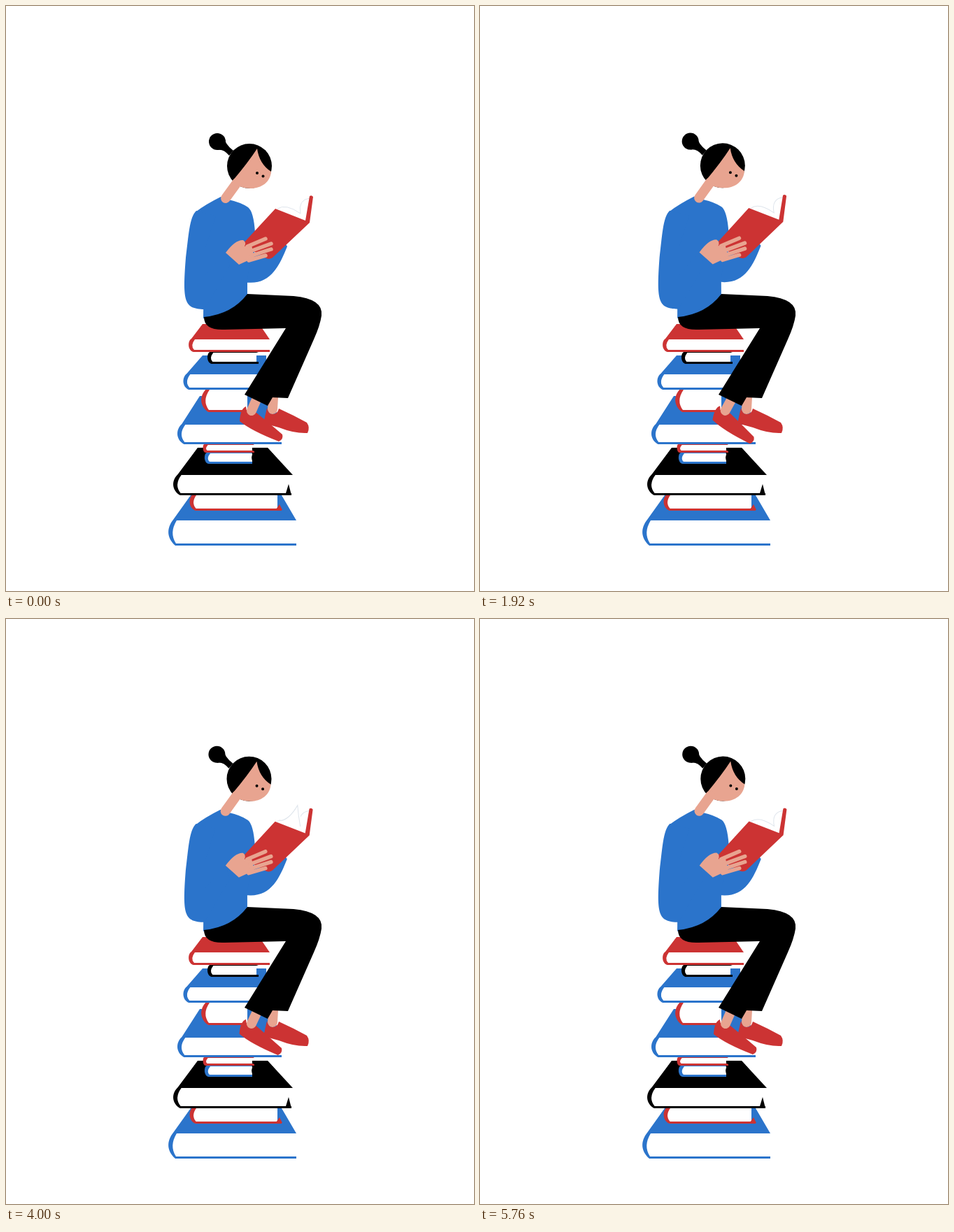
Animation, 669 px wide and 837 px high, one loop 5840 ms. Source, as an HTML page with a canvas:

```html
<!DOCTYPE html>
<html lang="en">
<head>
<meta charset="utf-8">
<title>Reader on a stack of books</title>
<style>
html, body { margin: 0; width: 100%; height: 100%; overflow: hidden; background: #fff; }
canvas { display: block; }
</style>
</head>
<body>
<canvas id="stage" width="669" height="837"></canvas>
<script>
const ctx = document.getElementById('stage').getContext('2d');
const BLUE = '#2b74cb', RED = '#cc3333', SKIN = '#e8a490', BLACK = '#000', WHITE = '#fff';
const LOOP = 5840, STEP = 80;

const lerp = (a, b, p) => a + (b - a) * p;
const clamp = v => Math.max(0, Math.min(1, v));
const ease = p => (1 - Math.cos(Math.PI * clamp(p))) / 2;

// Eased value between [time, value] keys
function track(keys, t) {
  const i = Math.max(1, keys.findIndex(k => k[0] > t));
  const [t0, v0] = keys[i - 1], [t1, v1] = keys[i];
  return lerp(v0, v1, ease((t - t0) / (t1 - t0)));
}

// Blend two paths that share the same commands
function blend(a, b, p) {
  const target = b.match(/[\d.]+/g);
  let i = 0;
  return a.replace(/[\d.]+/g, n => lerp(+n, +target[i++], p));
}

function fill(color, path) {
  ctx.fillStyle = color;
  ctx.fill(new Path2D(path));
}

function line(color, width, path) {
  ctx.strokeStyle = color;
  ctx.lineWidth = width;
  ctx.stroke(new Path2D(path));
}

function dot(color, x, y, r) {
  ctx.fillStyle = color;
  ctx.beginPath();
  ctx.arc(x, y, r, 0, 7);
  ctx.fill();
}

// Move the pivot to (x, y), turned by deg
function placed(px, py, x, y, deg, draw, scale = 1) {
  ctx.save();
  ctx.translate(x, y);
  ctx.rotate(deg * Math.PI / 180);
  ctx.scale(scale, scale);
  ctx.translate(-px, -py);
  draw();
  ctx.restore();
}

// Page block, then cover top, then spine with the lower cover
function stackBook(color, l, r, top, mid, bottom, topL, topR, edge = r) {
  const c = (mid + bottom) / 2, inset = Math.min(10, (bottom - mid) / 3), x = l + inset;
  fill(WHITE, `M${x} ${mid}L${edge} ${mid}L${edge} ${bottom}L${x} ${bottom}Q${l} ${c} ${x} ${mid}Z`);
  fill(color, `M${topL} ${top}L${topR} ${top}L${r} ${mid}L${x - 1} ${mid}Z`);
  fill(color, `M${topL} ${top}L${x + 2} ${mid}Q${l + 1} ${c} ${x + 1} ${bottom - 3}L${r} ${bottom - 3}L${r} ${bottom}
    L${x} ${bottom}C${l - 2.5} ${c + 7} ${l - 2.5} ${c - 7} ${x - 3} ${mid - 1}Z`);
}

function stack() {
  stackBook(BLUE, 232, 415, 700, 736, 772, 264, 394);
  stackBook(RED, 263, 394, 699, 699, 722, 270, 386, 388);
  fill(RED, 'M386 720L391 713L395 721Z');
  stackBook(BLACK, 239, 408, 632, 671, 700, 274, 374);
  fill(BLACK, 'M374 632L410 671L400 671Z');
  fill(BLACK, 'M404 684L408 700L400 697Z');
  stackBook(BLUE, 285, 352, 639, 640, 655, 289, 351);
  fill(BLACK, 'M354 640Q348 645 354 655L360 655V640Z');
  stackBook(RED, 283, 355, 626, 628, 639, 288, 352, 352);
  fill(BLACK, 'M353 632L362 632L361 637L355 637Q350 636 353 632Z');
  stackBook(BLUE, 245, 394, 558, 599, 627, 277, 377);
  stackBook(RED, 279, 345, 548, 549, 581, 284, 345);
  stackBook(BLUE, 254, 372, 500, 527, 549, 281, 372);
  stackBook(BLACK, 289, 361, 495, 496, 512, 293, 358, 358);
  stackBook(RED, 262, 377, 455, 477, 495, 281, 362);
}

function legs(foot) {
  line(SKIN, 14, 'M382 560L381 577');
  fill(RED, 'M373 575Q375 584 381 584Q388 584 390 576Q410 585 430 596Q435 603 431 611Q413 612 390 603L368 597Z');
  placed(352, 575, 352, 575, foot, () => {
    fill(RED, 'M343 573Q335 576 334 594Q351 608 390 623Q397 620 395 613Q380 600 358 582L344 580Z');
    line(SKIN, 14, 'M358 563L351 579');
  });
}

function pants() {
  fill(BLACK, `M283 445Q323 441 345 412L411 415Q454 419 451 443Q449 457 440 477L403 561L381 560L374 572
    L341 556L400 461L312 463Q283 464 283 445Z`);
}

function torso(p) {
  fill(BLUE, blend('M340 310L356 355L390 325L402 344C390 374 377 401 340 395Z',
                   'M340 310L368 372L430 362L433 381C395 402 360 408 340 380Z', p));
  fill(BLUE, 'M307 273Q285 284 272 294L283 345L282 447Q325 445 345 415L345 390L356 324Q354 294 346 288Q336 281 318 277Z');
  if (p > 0) placed(431, 371, lerp(396, 431, p), lerp(335, 371, p), 0, farHand, p);
}

function farHand() {
  fill(SKIN, 'M431 361L441 353L460 349L466 358L464 373L447 379L432 379Z');
  line(SKIN, 6.5, 'M440 362L445 341M455 355L478 332M460 358L492 336M462 363L493 346M458 371L483 362');
}

function nearArm(p) {
  fill(BLUE, blend('M272 293C262 302 261 330 257 360C252 425 255 433 284 434L320 372L314 352L285 385L285 345L300 300Z',
                   'M272 293C255 312 235 350 222 388C219 402 220 412 226 418L290 457L303 437L253 402L280 345L300 300Z', p));
}

function nearHand() {
  fill(SKIN, 'M314 353Q328 334 339 335Q344 338 341 344L351 342L355 360L333 370Z');
  line(SKIN, 5.5, 'M345 344L371 333M349 351L379 340M351 357L379 348M347 364L371 357');
}

function head(p) {
  placed(348, 229, lerp(348, 313, p), lerp(229, 220, p), -56 * p, () => {
    dot(BLACK, 302, 194, 12);
    fill(BLACK, 'M311 186Q313 198 325 207L319 214Q311 204 302 206Z');
    dot(BLACK, 348, 229, 32);
    fill(SKIN, 'M324 250Q346 224 359 204Q362 226 379 237C378 252 365 261 350 261Q340 261 332 257Z');
    dot(BLACK, 359, 239, 2);
    dot(BLACK, 367.5, 243.5, 2);
  });
  line(SKIN, 14, blend('M330 253L314 275', 'M321 248L314 274', p));
}

function openBook(flip) {
  const faint = '#dfe5ec';
  fill(WHITE, 'M385 290Q402 280 421 293Q418 276 435 273L429 308Z');
  line(faint, 1, 'M388 290Q400 282 421 297Q417 277 434 275');
  if (flip) {
    const x = lerp(434, 392, flip), y = 288 - 22 * Math.sin(Math.PI * flip);
    fill(WHITE, `M392 288L${x} ${y}L428 306Z`);
    line(faint, 1, `M392 289Q405 288 ${x} ${y}Q${x + 1} 282 421 297`);
  }
  fill(RED, 'M337 342L385 290L428 307L434 272Q437 270 439 273L434 310L381 360Q377 363 372 361Z');
}

function tossedBook() {
  fill(WHITE, 'M8 579Q6 602 20 617L25 634L34 602Z');
  line('#e3ecf5', 1, 'M9 584Q7 602 19 617M13 588L25 628M17 594L27 620');
  fill(RED, 'M8 579Q25 571 40 559Q45 556 51 559Q62 565 66 579Q63 598 54 612Q40 625 24 635L30 603Z');
}

function draw(t) {
  const p = ease((t - 4560) / 320) - ease((t - 5280) / 320);
  const sway = track([[0, 0], [960, 1.1], [2720, -1.4], [4560, .2], [5040, 0], [LOOP, -.2]], t);
  const foot = track([[0, 0], [1200, 0], [1920, 5], [3200, 2.5], [4000, 1.5], [4800, 0], [LOOP, 0]], t);
  const flip = t > 2880 && t < 4480 ? (t - 2880) % 800 / 800 : 0;
  const upper = part => placed(230, 430, 230, 430, sway, part);

  ctx.clearRect(0, 0, 669, 837);
  ctx.lineCap = 'round';
  stack();
  legs(foot);
  upper(() => { torso(p); head(p); });
  pants();
  upper(() => {
    nearArm(p);
    if (t < 4640) openBook(flip);
    if (t >= 5120) {
      const fall = clamp((t - 5080) / 240), home = ease((t - 5280) / 320);
      placed(385, 325, lerp(448, 385, home), lerp(lerp(-40, 328, fall), 325, home),
        35 * (1 - fall), () => openBook(0));
    }
    placed(323, 361, lerp(323, 297, p), lerp(361, 447, p), 84 * p, nearHand);
  });
  if (t >= 4640 && t < 5200) {
    const u = (t - 4600) / 440;
    placed(37, 595, 385 - 348 * u, 325 - 650 * u + 920 * u * u, 220 * (1 - u), tossedBook);
  }
}

function tick(now) {
  draw(Math.floor(now % LOOP / STEP) * STEP);
  requestAnimationFrame(tick);
}
requestAnimationFrame(tick);
</script>
</body>
</html>
```
